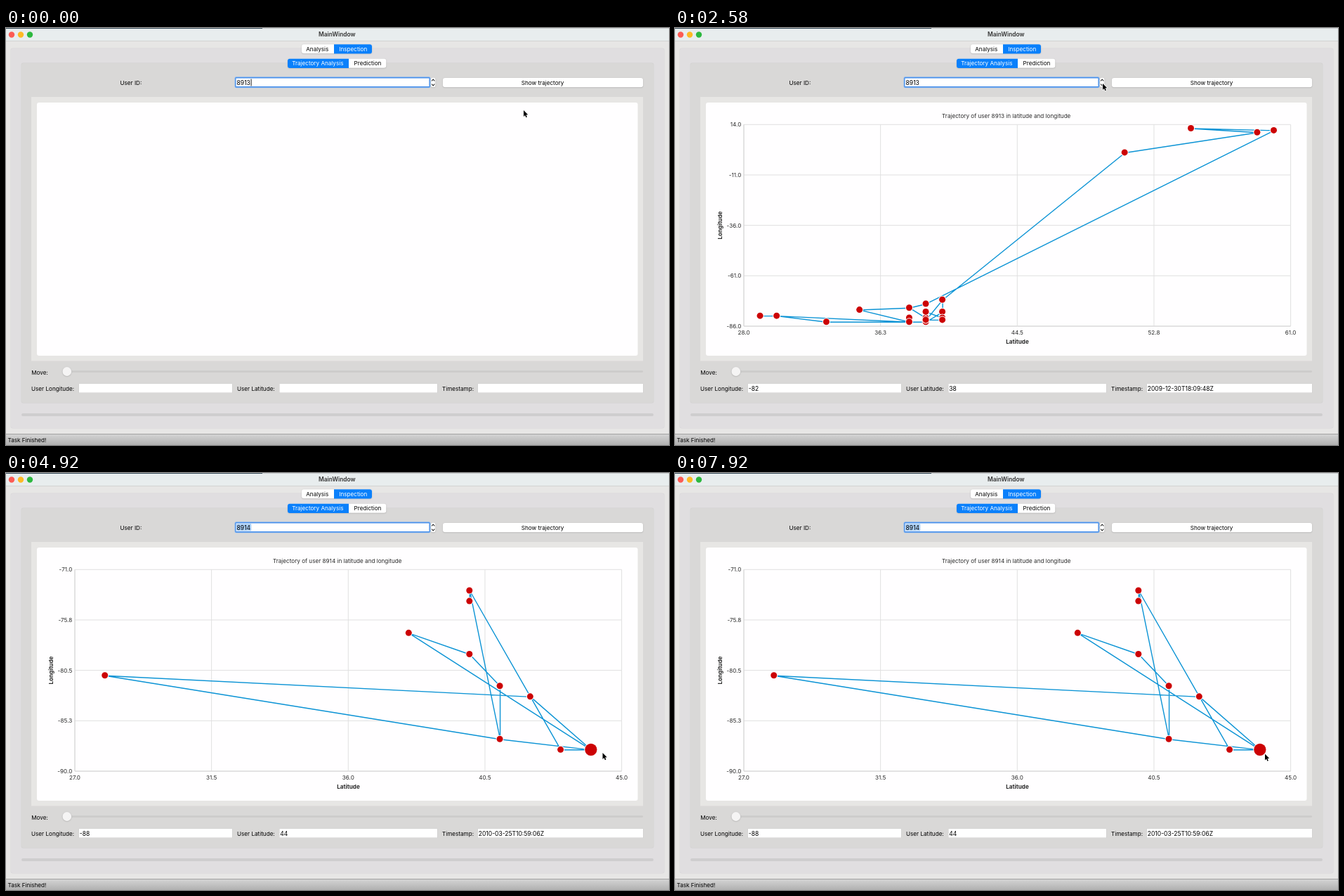
Animation of 944x593 px, one loop 8 s. Source, as an HTML page with a canvas:

```html
<!DOCTYPE html>
<html lang="en">
<head>
<meta charset="utf-8">
<title>Trajectory inspection</title>
<style>
  html, body { margin: 0; width: 100%; height: 100%; overflow: hidden; background: #e7e6e5; }
  canvas { display: block; }
</style>
</head>
<body>
<canvas id="stage" width="944" height="593"></canvas>
<script>
const ctx = document.getElementById('stage').getContext('2d');
const LOOP = 8000, SHOW_FIRST = 900, STEP_UP = 2900, SHOW_SECOND = 3960;
const FONT = 'Inter, "Open Sans", sans-serif';
const PLOT = { x: 98, y: 137.3, w: 778.6, h: 286.7 };
const BLUE = '#0a80fb';

// A route lists [latitude, longitude]; it starts at the current position.
function makeChart(user, stamp, headRadius, route) {
  const lats = route.map(p => p[0]), lons = route.map(p => p[1]);
  const dots = [...new Map(route.map(p => [p.join(), p])).values()];
  return {
    user, headRadius, route, dots,
    x: [Math.min(...lats) - 1, Math.max(...lats) + 1],
    y: [Math.max(...lons) + 2, Math.min(...lons) - 2],
    fields: [lons[0], lats[0], stamp]
  };
}

const first = makeChart(8913, '2009-12-30T18:09:48Z', 4.5, [
  [38, -82], [38, -84], [35, -78], [38, -84], [30, -81], [29, -81], [30, -81], [33, -84],
  [39, -84], [40, -79], [40, -73], [51, 0], [59, 10], [55, 12], [60, 11], [39, -75],
  [38, -77], [35, -78], [38, -77], [39, -82], [39, -79], [40, -82], [40, -83], [39, -83], [40, -73]
]);
const second = makeChart(8914, '2010-03-25T10:59:06Z', 8.6, [
  [44, -88], [38, -77], [40, -79], [41, -82], [41, -87], [40, -73], [40, -74], [40, -73],
  [42, -83], [43, -88], [44, -88], [42, -83], [28, -81], [41, -87], [44, -88]
]);

// Pointer moves: start time and destination; longer ways take longer.
const moves = [
  [100, 764, 79], [650, 821, 111], [1500, 609, 79], [3200, 621, 74],
  [3500, 638, 77], [3790, 595, 73], [4250, 849.5, 398], [5920, 840, 399.5]
];

function pointerAt(t) {
  let x = 737, y = 117;
  for (const [start, tx, ty] of moves) {
    if (t < start) break;
    const p = Math.min(1, (t - start) / (200 + Math.hypot(tx - x, ty - y)));
    const e = p * p * (3 - 2 * p);
    x += (tx - x) * e;
    y += (ty - y) * e;
    if (p < 1) break;
  }
  return [x, y];
}

function text(str, x, y, { align = 'left', color = '#000', weight = 400, size = 8.15 } = {}) {
  ctx.font = `${weight} ${size}px ${FONT}`;
  ctx.textAlign = align;
  ctx.fillStyle = color;
  ctx.fillText(str, x, y);
}

function box(x, y, w, h, color, r = 0) {
  ctx.fillStyle = color;
  ctx.beginPath();
  ctx.roundRect(x, y, w, h, r);
  ctx.fill();
}

function disc(x, y, r, color) {
  ctx.fillStyle = color;
  ctx.beginPath();
  ctx.arc(x, y, r, 0, Math.PI * 2);
  ctx.fill();
}

function line(points, color, width) {
  ctx.strokeStyle = color;
  ctx.lineWidth = width;
  ctx.beginPath();
  points.forEach(([x, y]) => ctx.lineTo(x, y));
  ctx.stroke();
}

function shadowed(draw) {
  ctx.save();
  ctx.shadowColor = 'rgba(0,0,0,.25)';
  ctx.shadowBlur = 1.5;
  ctx.shadowOffsetY = 0.5;
  draw();
  ctx.restore();
}

function drawWindow() {
  box(0, 0, 944, 593, '#e7e6e5');
  box(0, 0, 944, 18, '#e8edee');
  box(0, 18, 944, 1, '#d2d3d3');
  box(0, 0, 944, 1, '#c9cdcf');
  box(0, 0, 365, 1, '#3a4c5a');
  ['#fc5b54', '#fdb924', '#2cb83f'].forEach((c, i) => disc(8 + 13 * i, 9.5, 4.2, c));
  text('MainWindow', 471.3, 12.3, { align: 'center', weight: 600, size: 8.4, color: '#333' });

  box(6.5, 28.5, 931, 541, '#d9d7d9', 3);
  box(7, 29, 930, 540, '#e0dee0', 3);
  box(21.5, 49.5, 901, 484, '#d2d1d1', 3);
  box(22, 50, 900, 483, '#d9d8d7', 3);
  box(36, 98, 871, 375.5, '#e7e6e4');
  box(44, 106, 855.5, 360, '#fffeff', 3);

  box(22, 548, 900, 4, '#cecdce', 2);
  const bar = ctx.createLinearGradient(0, 577, 0, 593);
  bar.addColorStop(0, '#d6d6d6');
  bar.addColorStop(1, '#b0b0b0');
  box(0, 577, 944, 16, bar);
  box(0, 577, 944, 1, '#a2a2a2');
  text('Task Finished!', 2.5, 589.4);
}

function tabs(x, y, split, end, labels, active) {
  shadowed(() => box(x, y, end - x, 13, '#fff', 3));
  const edges = [x, split, end];
  labels.forEach((label, i) => {
    const on = i === active, l = edges[i], r = edges[i + 1];
    if (on) box(l, y, r - l, 13.2, BLUE, i ? [0, 3, 3, 0] : [3, 0, 0, 3]);
    text(label, (l + r) / 2 + i - 0.7, y + 9.5, { align: 'center', color: on ? '#fff' : '#000' });
  });
}

function drawUserId(t) {
  const stepped = t >= STEP_UP;
  text('User ID:', 162.5, 80.5);
  box(325.5, 69.3, 279, 16, '#8db9ee', 2.5);
  box(326.3, 70.1, 277.4, 14.4, '#4b91ea', 1.5);
  box(327.6, 71.5, 274.8, 11.6, '#fff');
  if (stepped) box(328.3, 72.3, 21, 10, '#a8cdf4');
  text((stepped ? second : first).user, 328.6, 80.5, { size: 8.5 });
  if (!stepped && (t + 200) % 1060 < 530) box(348.6, 72.4, 0.9, 10, '#000');

  shadowed(() => box(605, 70.8, 6.4, 13.4, '#fff', 2.5));
  [-1, 1].forEach(s => {
    const y = 77.5 + 2.2 * s;
    line([[606.1, y], [608.2, y + 2.3 * s], [610.3, y]], '#222', 1.1);
  });
}

function drawControls(t, chart) {
  tabs(421, 23.3, 467, 521, ['Analysis', 'Inspection'], 1);
  tabs(401, 43.8, 488, 541.3, ['Trajectory Analysis', 'Prediction'], 0);
  drawUserId(t);

  const pressed = [480, 3680].some(click => t >= click && t < click + 130);
  shadowed(() => box(622, 71, 285, 13.3, pressed ? '#ebebeb' : '#fff', 3));
  text('Show trajectory', 764, 80.5, { align: 'center' });

  text('Move:', 36.2, 492.8);
  box(80, 487.2, 827, 2.6, '#cccbca', 1.3);
  shadowed(() => disc(86.8, 488.5, 6.4, '#f5f4f4'));

  [['User Longitude:', 36, 104, 322], ['User Latitude:', 329, 389.5, 614],
    ['Timestamp:', 621, 672, 907]].forEach(([label, x, l, r], i) => {
    text(label, x, 515.5);
    box(l - 0.4, 505.7, r - l + 0.8, 13.4, '#cbcaca');
    box(l, 506.1, r - l, 12.5, '#fff');
    if (chart) text(chart.fields[i], l + 0.8, 515.5, { size: 8.5 });
  });
}

function tick([a, b], i) {
  const v = a + (b - a) * i / 4;
  return (Math.sign(v) * Math.round(Math.abs(v) * 10) / 10).toFixed(1);
}

function drawChart(c) {
  const label = { color: '#2a2a2a', align: 'center' };
  const bold = { ...label, weight: 700 };
  const right = PLOT.x + PLOT.w, bottom = PLOT.y + PLOT.h;
  const place = ([lat, lon]) => [
    PLOT.x + PLOT.w * (lat - c.x[0]) / (c.x[1] - c.x[0]),
    PLOT.y + PLOT.h * (lon - c.y[0]) / (c.y[1] - c.y[0])
  ];

  text(`Trajectory of user ${c.user} in latitude and longitude`, 471.7, 128, label);
  for (let i = 0; i <= 4; i++) {
    const x = PLOT.x + PLOT.w * i / 4, y = PLOT.y + PLOT.h * i / 4;
    line([[x, PLOT.y], [x, bottom]], '#e0e0e0', 1);
    line([[PLOT.x, y], [right, y]], '#e0e0e0', 1);
    text(tick(c.x, i), x, 435.6, label);
    text(tick(c.y, i), 94.3, y + 2.9, { ...label, align: 'right' });
  }
  line([[PLOT.x, PLOT.y], [PLOT.x, bottom], [right, bottom]], '#d6d6d6', 1);
  text('Latitude', 487.5, 449, bold);
  ctx.save();
  ctx.translate(67, 280.6);
  ctx.rotate(-Math.PI / 2);
  text('Longitude', 0, 0, bold);
  ctx.restore();

  ctx.lineJoin = 'round';
  line(c.route.map(place), '#0b93d5', 1.4);
  c.dots.forEach((p, i) => {
    const [x, y] = place(p).map(v => v - 0.5);
    const r = i ? 4.5 : c.headRadius;
    disc(x, y, r + 1, '#fff');
    disc(x, y, r, '#cc0205');
  });
}

function drawPointer(t) {
  const [x, y] = pointerAt(t);
  ctx.save();
  ctx.translate(x, y);
  if (x > 327 && x < 603 && y > 70 && y < 85) {
    const beam = [[-2, -4.5], [0, -3.7], [2, -4.5], [0, -3.7], [0, 3.7], [-2, 4.5], [0, 3.7], [2, 4.5]];
    line(beam, '#fff', 2);
    line(beam, '#111', 0.9);
  } else {
    const arrow = [[0, 0], [0, 8.9], [2, 7.1], [3.4, 10.3], [4.9, 9.6], [3.5, 6.5], [6.2, 6.3], [0, 0]];
    line(arrow, '#fff', 1.5);
    ctx.fillStyle = '#000';
    ctx.fill();
  }
  ctx.restore();
}

function render(t) {
  const chart = t < SHOW_FIRST ? null : t < SHOW_SECOND ? first : second;
  drawWindow();
  drawControls(t, chart);
  if (chart) drawChart(chart);
  drawPointer(t);
}

const start = performance.now();
function frame() {
  render((performance.now() - start) % LOOP);
  requestAnimationFrame(frame);
}
frame();
</script>
</body>
</html>
```
